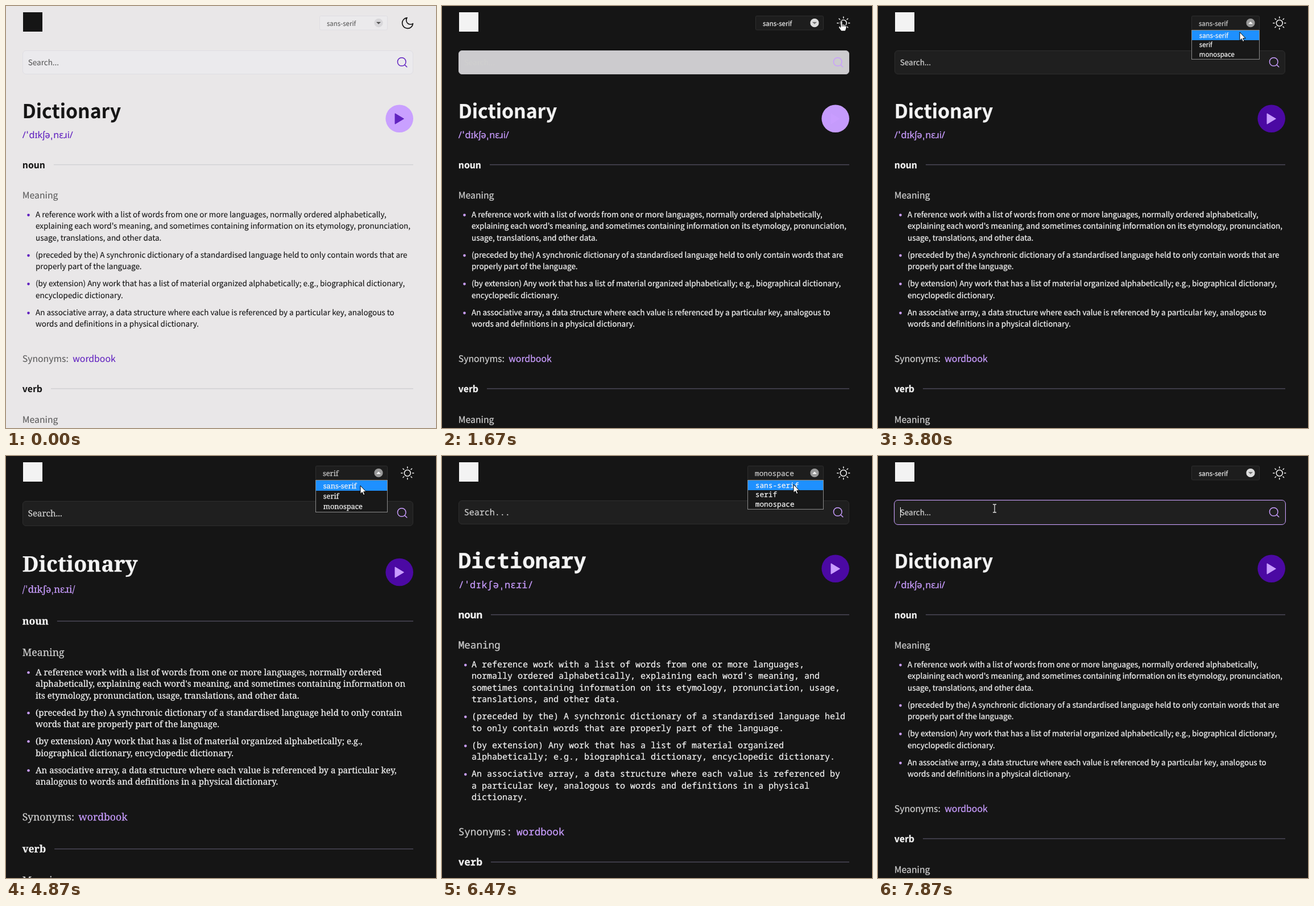
An HTML page for the animation above (8 s loop, 756 by 741 pixels).

```html
<!DOCTYPE html>
<html lang="en">
<head>
<meta charset="utf-8">
<title>Dictionary</title>
<style>
  html, body { margin: 0; width: 100%; height: 100%; overflow: hidden; }
  svg {
    display: block; width: 756px; height: 741px; background: var(--bg);
    text-rendering: geometricPrecision;
    --bg: #e9e7e8; --fg: #151515; --soft: #5c5c5c; --accent: #6122c0; --rule: #d2d1d4;
    --field: #ebeaec; --edge: #dfdee2; --pick: #5c5c5c; --knob: #d8d7da; --tip: #555;
    --play: #6122c0; --weight: .1px;
  }
  svg.dark {
    --bg: #151515; --fg: #f3f3f3; --soft: #cfcfcf; --accent: #c99dff; --rule: #4b4857;
    --field: #1d1d1d; --edge: #2e2e2e; --pick: #e8e8e8; --knob: #dedede; --tip: #777;
    --play: #c99dff; --weight: .25px;
  }
  text {
    color: var(--fg); fill: currentColor; white-space: pre;
    stroke: currentColor; stroke-width: var(--weight);
  }
  text.soft { color: var(--soft); }
  text.pick { color: var(--pick); }
  text.accent { color: var(--accent); }
  circle.accent { fill: var(--accent); }
  .line { fill: none; stroke: var(--fg); stroke-linecap: round; stroke-linejoin: round; }
  .rule { fill: var(--rule); }
  .field { fill: var(--field); stroke: var(--edge); }
  .list { fill: #181818; stroke: #8a8a8a; }
  .cursor { fill: #fff; stroke: #000; stroke-linejoin: round; }
</style>
</head>
<body>
<svg id="stage" viewBox="0 0 756 741"></svg>
<script>
const LOOP = 8000, LEFT = 28.8, RIGHT = 716;
const stage = document.getElementById('stage');
const pen = document.createElement('canvas').getContext('2d');
pen.textRendering = 'geometricPrecision';

const MEANINGS = [
  "A reference work with a list of words from one or more languages, normally ordered alphabetically, explaining each word's meaning, and sometimes containing information on its etymology, pronunciation, usage, translations, and other data.",
  "(preceded by the) A synchronic dictionary of a standardised language held to only contain words that are properly part of the language.",
  "(by extension) Any work that has a list of material organized alphabetically; e.g., biographical dictionary, encyclopedic dictionary.",
  "An associative array, a data structure where each value is referenced by a particular key, analogous to words and definitions in a physical dictionary."
];
const OPTIONS = ['sans-serif', 'serif', 'monospace'];

function add(parent, tag, attrs = {}, content) {
  const node = document.createElementNS('http://www.w3.org/2000/svg', tag);
  for (const key in attrs) node.setAttribute(key, attrs[key]);
  if (content !== undefined) node.textContent = content;
  parent.appendChild(node);
  return node;
}

function measure(content, size, family, weight = 400) {
  pen.font = `${weight} ${size}px ${family}`;
  return pen.measureText(content).width;
}

// Ratio that gives a family the wanted width in em for a sample.
const ratio = (family, sample, em) => em * 100 / measure(sample, 100, family);

const SANS = '"Noto Sans CJK JP", "Noto Sans CJK SC", "Noto Sans CJK", "Open Sans", sans-serif';
const SERIF = '"Noto Serif", "DejaVu Serif", serif';
const MONO = '"Noto Sans Mono", "DejaVu Sans Mono", monospace';
const SAMPLE = MEANINGS[0].slice(0, MEANINGS[0].indexOf(' explaining'));

// y values are baselines, except rules (centre lines) and play (centre)
const LAYOUTS = {
  sans: {
    family: SANS, k: ratio(SANS, SAMPLE, 41.13), ipa: '16.2px "Noto Sans", sans-serif', stress: 1.5, name: 0,
    box: 551.5, row: 16.5, option: 56, field: [78.5, 41], search: 104, icon: 0,
    head: 197, sound: 232, play: 197.8, rules: [278.7, 672], drop: 6.3, gap: 59.5,
    body: 371, bullet: [39.5, 3.9], syn: 625
  },
  serif: {
    family: SERIF, k: 1.004, ipa: '16.9px ' + SERIF, stress: 1.3, name: 1,
    box: 544.5, row: 18.3, option: 57, field: [79.5, 43], search: 106, icon: 1,
    head: 203, sound: 240, play: 204, rules: [290, 690], drop: 6, gap: 61,
    body: 385, bullet: [39.5, 4.7], syn: 640
  },
  mono: {
    family: MONO, k: ratio(MONO, 'n', .6), ipa: '16.9px ' + MONO, stress: 0, name: 2,
    box: 537.5, row: 16.5, option: 56, field: [78.5, 41], search: 104, icon: 0,
    head: 197, sound: 232, play: 197.8, rules: [278.7, 713], drop: 6.3, gap: 59.5,
    body: 371, bullet: [41.3, 3.9], syn: 666
  }
};

function wrap(content, width, size, family) {
  const lines = [''];
  for (const word of content.split(' ')) {
    const last = lines.length - 1;
    const longer = lines[last] ? lines[last] + ' ' + word : word;
    if (lines[last] && measure(longer, size, family) > width) lines.push(word);
    else lines[last] = longer;
  }
  return lines;
}

function buildPage(o) {
  const g = add(stage, 'g');
  const write = (content, x, y, size, cls = '', weight = 400) =>
    add(g, 'text', { x, y, class: cls, style: `font: ${weight} ${size * o.k}px ${o.family}` }, content);

  // font picker
  add(g, 'rect', { x: o.box, y: 17.5, width: 670.5 - o.box, height: 24.5, rx: 2, class: 'field' });
  const picked = write(OPTIONS[o.name], o.box + 12.5, 35, 12.75, 'pick');
  const knob = add(g, 'circle', { cx: 655, cy: 29.7, r: 7.6 });
  const tip = add(g, 'path');

  // search field
  const [top, height] = o.field;
  const field = add(g, 'rect', { x: 29.5, y: top, width: 686, height, rx: 5.5 });
  write('Search...', 38.8, o.search, 15, 'soft');
  const focus = add(g, 'g');
  add(focus, 'rect', { x: 28.5, y: top - 1, width: 688, height: height + 2, rx: 6.5, fill: 'none', stroke: '#c99dff' });
  add(focus, 'rect', { x: 39, y: 90, width: 1, height: 18, fill: '#fff' });
  add(g, 'path', {
    d: 'M703 98a7.3 7.3 0 1 1-14.6 0a7.3 7.3 0 1 1 14.6 0M701 103.4l3.8 3.6',
    class: 'line', transform: `translate(0 ${o.icon})`, style: 'stroke: var(--accent); stroke-width: 1.5'
  });

  // headword, with a little air around the stress marks
  write('Dictionary', LEFT, o.head, 37.5, '', 700);
  const s = o.stress;
  add(g, 'text', {
    x: LEFT, y: o.sound, dx: `0 ${s} ${s} 0 0 0 0 ${s} ${s}`, class: 'accent', style: 'font: ' + o.ipa
  }, '/ˈdɪkʃəˌnɛɹi/');
  const button = add(g, 'circle', { cx: 691.7, cy: o.play, r: 24.3 });
  add(g, 'path', {
    d: `M684 ${o.play - 9}v18.4l15.4-9.2z`, 'stroke-linejoin': 'round',
    style: 'fill: var(--play); stroke: var(--play); stroke-width: 1'
  });

  // parts of speech
  ['noun', 'verb'].forEach((word, i) => {
    const y = o.rules[i];
    write(word, LEFT, Math.round(y + o.drop), 17.55, '', 700);
    const x = LEFT + measure(word, 17.55 * o.k, o.family, 700) + 15;
    add(g, 'rect', { x, y: y - .8, width: RIGHT - x, height: 1.5, class: 'rule' });
    write('Meaning', LEFT, Math.round(y + o.gap), 17.55, 'soft');
  });

  let y = o.body;
  for (const meaning of MEANINGS) {
    add(g, 'circle', { cx: o.bullet[0], cy: Math.round(y) - o.bullet[1], r: 2.3, class: 'accent' });
    for (const line of wrap(meaning, 664, 15 * o.k, o.family)) {
      write(line, 52, Math.round(y), 15);
      y += 20.4;
    }
    y += 9.7;
  }

  write('Synonyms:', LEFT, o.syn, 17.55, 'soft');
  write('wordbook', LEFT + measure('Synonyms:', 17.55 * o.k, o.family) + 7.5, o.syn, 17.55, 'accent');

  // open list
  const list = add(g, 'g');
  const rowTop = i => Math.round(43 + i * o.row);
  add(list, 'rect', { x: o.box, y: 42.5, width: 670.5 - o.box, height: rowTop(3) - 42, class: 'list' });
  const mark = add(list, 'rect', { x: o.box + .5, width: 669.5 - o.box, height: Math.round(o.row), fill: '#1e90ff' });
  OPTIONS.forEach((name, i) => list.appendChild(write(name, o.box + 13.3, Math.floor(o.option + i * o.row), 12.75)));

  return { g, picked, knob, tip, field, focus, button, list, mark, rowTop };
}

const pages = {};
for (const name in LAYOUTS) pages[name] = buildPage(LAYOUTS[name]);

// plain square in place of the brand mark
add(stage, 'rect', { x: 30, y: 11, width: 34, height: 34, style: 'fill: var(--fg)' });

const moon = add(stage, 'path', {
  d: 'M21 12.79A9 9 0 1 1 11.21 3A7 7 0 0 0 21 12.79z', class: 'line',
  transform: 'translate(693.4 17.4) scale(1.05)', 'stroke-width': 1.6
});
const rays = Array.from({ length: 8 }, (_, i) => {
  const c = Math.cos(i * Math.PI / 4), s = Math.sin(i * Math.PI / 4);
  return `M${c * 8.8} ${s * 8.8}L${c * 11} ${s * 11}`;
}).join('');
const sun = add(stage, 'path', {
  d: 'M5.5 0a5.5 5.5 0 1 1-11 0a5.5 5.5 0 1 1 11 0' + rays,
  class: 'line', transform: 'translate(705.8 30)', 'stroke-width': 1.5
});

const cursors = {
  arrow: add(stage, 'path', { class: 'cursor', d: 'M0 0V14.6L3.3 11.5L5.5 16.6L7.9 15.6L5.7 10.7H10.2Z' }),
  hand: add(stage, 'path', {
    class: 'cursor',
    d: 'M-1.6 1.3Q-1.4-.1 0 0Q1.3 0 1.5 1.3V6Q3.8 5.2 4.2 6.8Q6.2 6 6.6 7.6Q8.3 7.3 8.5 9V12.5L6.8 18H-.6L-4.6 12.5Q-5.8 10.4-4.4 9.8Q-3.2 9.4-1.6 11.4ZM1.5 6V10M4.2 6.8V10M6.6 7.6V10'
  }),
  beam: add(stage, 'path', {
    d: 'M-3-7H-1Q0-7 0-6Q0-7 1-7H3M0-6V6M-3 7H-1Q0 7 0 6Q0 7 1 7H3',
    fill: 'none', stroke: '#ddd', 'stroke-width': 1.3
  })
};

// time, x, y, pointer
const PATH = [
  [0, 0, 0, ''], [1000, 744, 38, 'arrow'], [1200, 715, 30, 'hand'], [1330, 702, 25, 'hand'],
  [1530, 702, 25, 'hand'], [1600, 702, 24, 'hand'], [1670, 702.5, 26, 'hand'], [2600, 702.5, 26, 'hand'],
  [2670, 703, 26, 'hand'], [2730, 703, 26, ''],
  [3330, 742, 32, 'arrow'], [3470, 660, 28, 'arrow'], [3530, 650, 27, 'arrow'], [3670, 650, 27, 'arrow'],
  [3730, 644, 33, 'arrow'], [3800, 636, 46, 'arrow'], [4000, 630, 64, 'arrow'], [4270, 630, 64, 'arrow'],
  [4530, 632, 32, 'arrow'], [4670, 632, 32, 'arrow'], [4800, 625, 40, 'arrow'], [4870, 623, 52, 'arrow'],
  [5000, 621, 63, 'arrow'], [5130, 618, 80, 'arrow'], [5200, 617, 82, 'arrow'], [5400, 617, 82, 'arrow'],
  [5470, 720, 96, 'arrow'], [5600, 720, 96, 'arrow'], [5670, 712, 88, 'arrow'], [5930, 615, 36, 'arrow'],
  [6000, 615, 36, 'arrow'], [6130, 614, 34, 'arrow'], [6330, 622, 62, 'arrow'], [6470, 618, 50, 'arrow'],
  [7070, 618, 50, 'arrow'], [7470, 341, 79, 'beam'], [7670, 205, 92, 'beam'], [LOOP, 205, 92, 'beam']
];

// time, page, highlighted option (-1 when closed)
const STATES = [
  [0, 'sans', -1], [3530, 'sans', 0], [3930, 'sans', 1],
  [4270, 'serif', -1], [4730, 'serif', 1], [4870, 'serif', 0], [5000, 'serif', 1], [5130, 'serif', 2],
  [5400, 'mono', -1], [6070, 'mono', 2], [6270, 'mono', 1], [6400, 'mono', 0], [7070, 'sans', -1]
];

const show = (node, on) => { node.style.display = on ? '' : 'none'; };
const mix = (a, b, p) => `rgb(${a.map((v, i) => Math.round(v + (b[i] - v) * p))})`;
const indexAt = (table, t) => table.findLastIndex(row => row[0] <= t);
const easeIn = p => p ** 1.7;

// cubic-bezier(.25, .1, .25, 1)
function ease(x) {
  const curve = (a, b, u) => 3 * a * u * (1 - u) ** 2 + 3 * b * u * u * (1 - u) + u ** 3;
  let lo = 0, hi = 1;
  for (let i = 0; i < 24; i++) {
    const mid = (lo + hi) / 2;
    if (curve(.25, .25, mid) < x) lo = mid; else hi = mid;
  }
  return curve(.1, 1, lo);
}

function moveCursor(t) {
  const i = indexAt(PATH, t);
  const [t0, x0, y0, kind] = PATH[i], [t1, x1, y1] = PATH[i + 1];
  const p = (t - t0) / (t1 - t0);
  for (const name in cursors) show(cursors[name], name === kind);
  if (kind) {
    const x = x0 + (x1 - x0) * p, y = y0 + (y1 - y0) * p;
    cursors[kind].setAttribute('transform', `translate(${x.toFixed(1)} ${y.toFixed(1)})`);
  }
}

function render(ms) {
  // picture advances 15 times a second
  const step = Math.floor((ms + 4) * 15 / 1000);
  const t = Math.min(Math.round(step * 100 / 15) * 10, LOOP - 10);
  const dark = t >= 1670;
  const fade = dark ? Math.min((t - 1630) / 300, 1) : 0;
  const [, name, option] = STATES[indexAt(STATES, t)];
  const open = option >= 0;

  stage.classList.toggle('dark', dark);
  show(moon, !dark);
  show(sun, dark);
  for (const key in pages) show(pages[key].g, key === name);

  const page = pages[name];
  page.field.style.fill = mix([235, 234, 237], [31, 31, 31], ease(fade));
  page.field.style.stroke = mix([223, 222, 227], [46, 46, 46], ease(fade));
  page.button.style.fill = mix([201, 160, 255], [75, 9, 163], easeIn(fade));
  show(page.focus, t >= 7800);
  show(page.list, open);
  page.picked.style.opacity = open ? .85 : 1;
  page.knob.style.fill = open ? '#999' : 'var(--knob)';
  page.tip.style.fill = open ? '#fff' : 'var(--tip)';
  page.tip.setAttribute('d', open ? 'M651 31.5h8l-4-4z' : 'M651 28h8l-4 4z');
  if (open) page.mark.setAttribute('y', page.rowTop(option));

  moveCursor(t);
}

const start = performance.now();
function tick() {
  render((performance.now() - start) % LOOP);
  requestAnimationFrame(tick);
}
tick();
</script>
</body>
</html>
```
